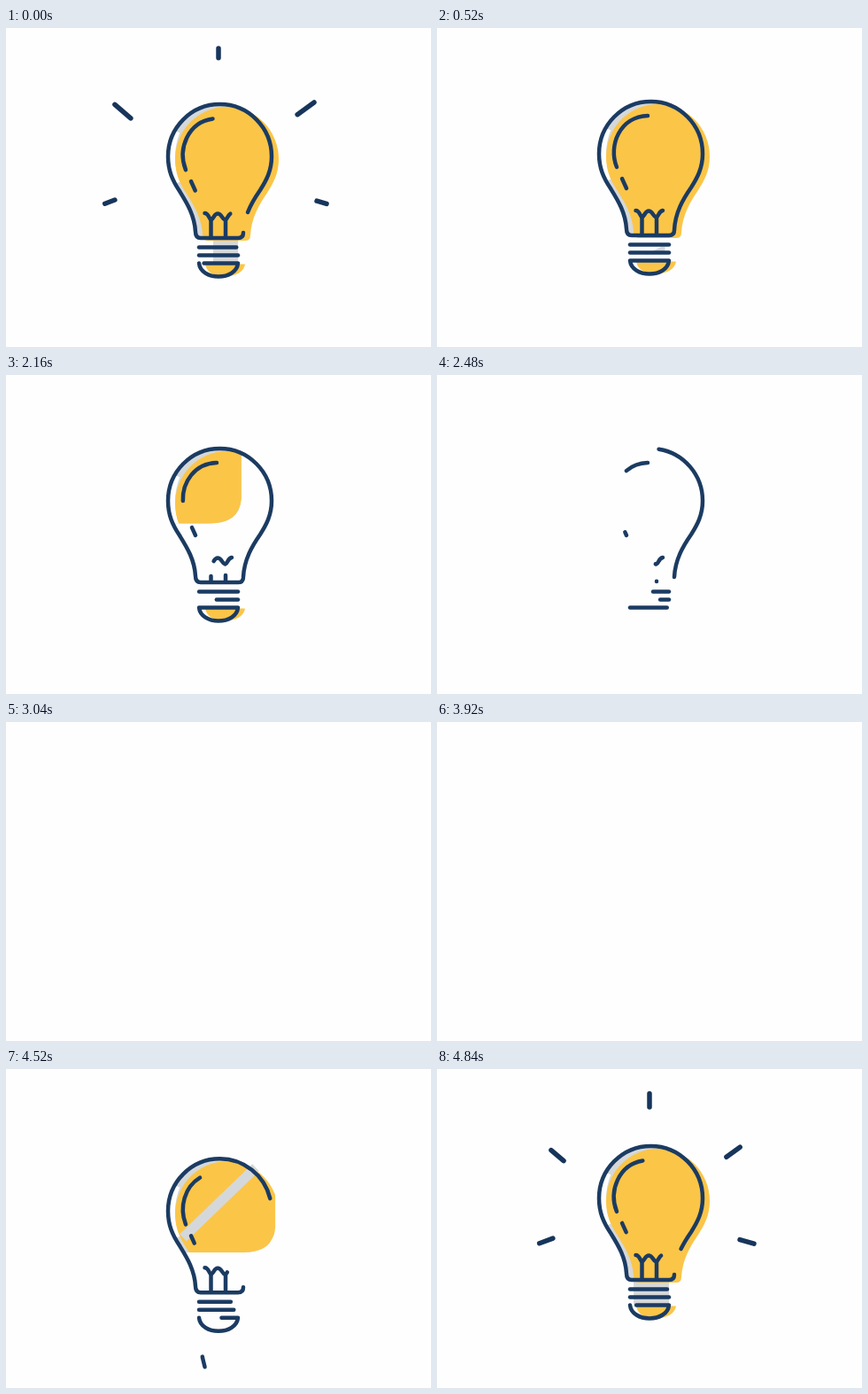
Recreate the animation shown at these times as an HTML page. Size 480 px wide and 360 px high, loop 4.88 s.

```html
<!DOCTYPE html>
<html lang="en">
<head>
<meta charset="utf-8">
<title>Light bulb</title>
<style>
  html, body { margin: 0; width: 100%; height: 100%; overflow: hidden; background: #fefefe; }
  svg { display: block; width: 100vw; height: 100vh; }
  .ink { fill: none; stroke: #1b3b62; stroke-width: 4.5; stroke-linecap: round; stroke-linejoin: round; }
  #rays { stroke: #17355b; stroke-width: 5.5; }
</style>
</head>
<body>
<svg viewBox="0 0 480 360">
  <defs>
    <path id="glass" d="M268 228Q268 234 262 234H220Q214 234 214 227C213 208 204 194 196 181C188 169 183 158 183 142A58.5 59 0 0 1 300 142C300 158 294 169 287 180C278 193 269 208 268 228"/>
    <clipPath id="wipe"><path id="wipeShape"/></clipPath>
    <clipPath id="capWipe"><rect id="capRect" x="220" y="255" height="30"/></clipPath>
  </defs>
  <g id="bulb">
    <g clip-path="url(#wipe)">
      <use href="#glass" fill="#d5d8da"/>
      <path d="M193 114Q182 142 193 172" fill="none" stroke="#fefefe" stroke-width="7"/>
      <path id="neck" fill="#d5d8da"/>
      <use href="#glass" x="8" y="3" fill="#fbc548"/>
      <path id="stripe" d="M200 172L282 93" stroke="#d5d8da"/>
    </g>
    <path clip-path="url(#capWipe)" fill="#fbc548" d="M225 263.500H270C269 272 259 277.500 247 277.500S226 272 225 263.500"/>
    <g id="lines" class="ink"></g>
  </g>
  <path id="cord" class="ink" pathLength="1" d="M240 366C250 356 262 352 265 345C269 336 256 334 247 337C236 341 228 350 225 338L222 326L220 314"/>
  <g id="rays" class="ink"></g>
</svg>
<script>
const LOOP = 4880;
const $ = id => document.getElementById(id);
const clamp = x => Math.min(1, Math.max(0, x));

// Smooth monotone curve through time/value pairs.
function track(...kv) {
  const T = kv.filter((_, i) => i % 2 === 0), V = kv.filter((_, i) => i % 2);
  const n = T.length - 1;
  const slope = T.slice(1).map((x, i) => (V[i + 1] - V[i]) / (x - T[i]));
  const tan = T.map((_, i) => {
    if (i === 0) return slope[0];
    if (i === n) return slope[n - 1];
    const a = slope[i - 1], b = slope[i];
    return a * b > 0 ? 2 * a * b / (a + b) : 0;
  });
  return u => {
    if (u <= T[0]) return V[0];
    if (u >= T[n]) return V[n];
    const i = T.findIndex(x => x > u) - 1;
    const h = T[i + 1] - T[i], s = (u - T[i]) / h, r = 1 - s;
    return V[i] * (1 + 2 * s) * r * r + V[i + 1] * s * s * (3 - 2 * s)
      + h * s * r * (tan[i] * r - tan[i + 1] * s);
  };
}

function addPath(parent, d) {
  const el = document.createElementNS("http://www.w3.org/2000/svg", "path");
  el.setAttribute("d", d);
  el.setAttribute("pathLength", 1);
  parent.append(el);
  return el;
}

function trim(el, from, to) {
  const len = to - from;
  el.style.display = len > 0.004 ? "" : "none";
  el.style.strokeDasharray = `${Math.max(len, 0)} 2`;
  el.style.strokeDashoffset = -from;
}

// path, lead when drawing, draw rate, erase start, erase end
const lines = [
  [$("glass").getAttribute("d"), 0, 1, 2160, 3050],
  ["M203 157C193 132 207 100 238 99", 0, 1, 2060, 3050],
  ["M209 170L214 181", 0, 1, 2060, 3050],
  ["M224.500 206C229 206 229 212 231.500 213.500C235 212 235 206 239.500 206.500C244 207 244 213 247.500 213.500C251 212 250 207 255 206", 120, 1, 1946, 3050],
  ["M231.500 213V233", 100, 1.5, 1880, 2500],
  ["M248 213V233", 100, 1.4, 1900, 2540],
  ["M218 244.500H262", 100, 1, 2160, 3050],
  ["M218 253.500H262", 120, 1.08, 1850, 3050],
  ["M218 262.500C219 272 229 277.500 240 277.500S261 272 262 262.500H218", 0, 1, 2160, 3050]
].map(([d, lead, rate, start, end]) => ({ el: addPath($("lines"), d), lead, rate, start, end }));

// path, then head and tail at 4840 and 4880
const rays = [
  ["M240 55V22", .82, .36, .97, .64],
  ["M155 114L119 83", .72, .33, .89, .39],
  ["M315 108L352 81", .73, .32, .89, .38],
  ["M143 186.500L103 201.500", .68, .3, .78, .5],
  ["M330 189L371 201", .68, .29, .78, .51]
].map(([d, h1, t1, h2, t2]) => ({
  el: addPath($("rays"), d),
  head: track(4680, 0, 4840, h1, 4880, h2, 5040, 1),
  tail: track(4740, 0, 4840, t1, 4880, t2, 5120, 1)
}));

const draw = track(4040, 0, 4240, .325, 4440, .68, 4520, .75, 4840, .93, 4880, .945, 5400, 1);
const cordHead = track(3920, 0, 4240, .52, 4520, .9, 4600, 1);
const cordTail = track(4000, 0, 4240, .19, 4520, .79, 4620, 1);
const wipeOutX = track(1800, 314, 2160, 266, 2320, 180);
const wipeOutY = track(1800, 270, 2160, 168, 2320, 75);
const wipeInX = track(4440, 180, 4520, 304, 4680, 314);
const wipeInY = track(4440, 75, 4520, 188, 4700, 270);
const stripe = track(4440, 14, 4520, 11, 4640, 0);
const capOut = track(2200, 52, 2320, 0);
const capIn = track(4600, 0, 4780, 52);
const neckLeft = track(4700, 218, 4840, 222, 4880, 234, 5400, 235);
const neckSkew = track(4880, 0, 5400, 18);
const neckTop = track(4880, 236, 5400, 247);
const neckBottom = track(4880, 262, 5400, 256);

function render(ms) {
  // The entrance runs across the loop point, so early times count as late ones.
  const u = ms < 600 ? ms + LOOP : ms;
  const entering = u > 3500;

  const y = entering ? 47 * (Math.max(0, 5400 - u) / 1160) ** 3.4 : 0;
  $("bulb").setAttribute("transform", `translate(0 ${y})`);

  for (const l of lines) {
    const to = entering ? clamp(draw(u + l.lead) * l.rate) : 1;
    const from = entering ? 0 : 1 - (1 - clamp((u - l.start) / (l.end - l.start))) ** 2;
    trim(l.el, from, to);
  }
  for (const r of rays) trim(r.el, r.tail(u), r.head(u));
  trim($("cord"), cordTail(u), cordHead(u));

  const right = (entering ? wipeInX : wipeOutX)(u);
  const bottom = (entering ? wipeInY : wipeOutY)(u);
  $("wipeShape").setAttribute("d",
    `M100 40H${right}V${bottom - 28}Q${right - 2} ${bottom} ${right - 36} ${bottom}H100Z`);
  $("capRect").setAttribute("width", (entering ? capIn : capOut)(u));

  const band = entering ? stripe(u) : 0;
  $("stripe").style.strokeWidth = band;

  const n = entering ? u : 5400;
  const left = neckLeft(n), top = neckTop(n), low = neckBottom(n), skew = neckSkew(n);
  $("neck").setAttribute("d",
    `M${left} ${low}L${left + skew} ${top}H${262 - skew / 4}L${262 - skew / 4} ${low - skew / 4}Z`);
}

function tick() {
  render(performance.now() % LOOP);
  requestAnimationFrame(tick);
}
tick();
</script>
</body>
</html>
```
